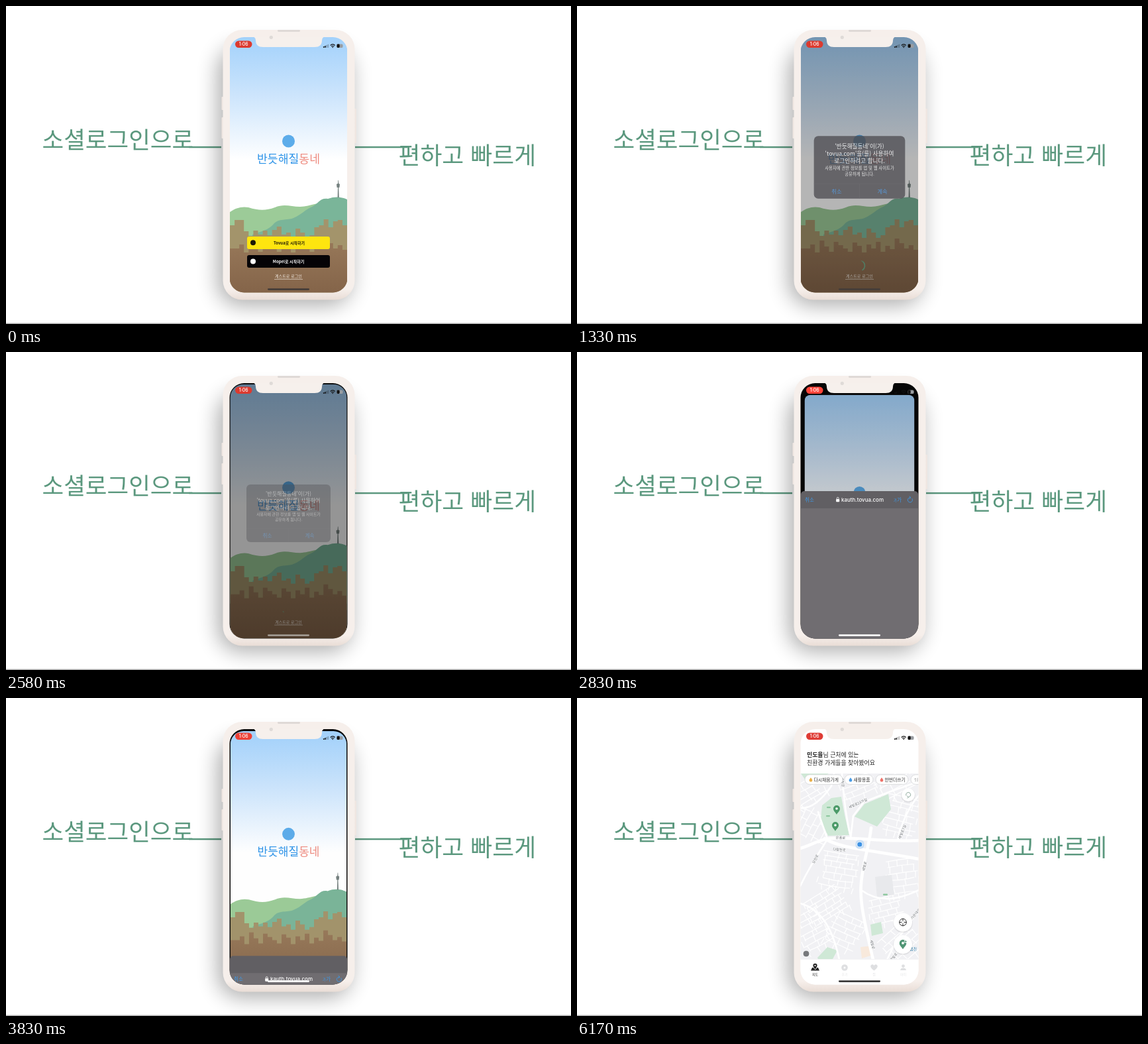
These frames come from a looping animation (853 px wide and 480 px high, 6260 ms). An HTML page:

```html
<!DOCTYPE html>
<html lang="ko">
<head>
<meta charset="utf-8">
<style>
  html, body { margin: 0; width: 100%; height: 100%; overflow: hidden; background: #fff; }
  svg { display: block; width: 100vw; height: 100vh; }
  text { font-family: "Noto Sans CJK KR", "Noto Sans CJK", "Noto Sans", sans-serif; }
</style>
</head>
<body>
<svg id="stage" viewBox="0 0 853 480"></svg>
<script>
const LOOP = 6260, STEP = 1000 / 12, CX = 426.5;
const stage = document.getElementById('stage');

// ---- markup helpers: text is placed by its vertical centre ----
const text = (x, y, size, str, attrs = '') =>
  `<text x="${x}" y="${y + size * .37}" font-size="${size}" ${attrs}>${str}</text>`;
const mid = (x, y, size, str, attrs = '') => text(x, y, size, str, 'text-anchor="middle" ' + attrs);
const rect = (x, y, w, h, fill, r = 0, attrs = '') =>
  `<rect x="${x}" y="${y}" width="${w}" height="${h}" rx="${r}" fill="${fill}" ${attrs}/>`;
const dot = (x, y, r, fill, attrs = '') => `<circle cx="${x}" cy="${y}" r="${r}" fill="${fill}" ${attrs}/>`;
const path = (d, attrs) => `<path d="${d}" ${attrs}/>`;
const line = (d, color, w = 1) => path(d, `fill="none" stroke="${color}" stroke-width="${w}" stroke-linecap="round" stroke-linejoin="round"`);
const group = (id, body, attrs = '') => `<g id="${id}" ${attrs}>${body}</g>`;

function random(seed) {
  return () => (seed = (seed * 16807) % 2147483647) / 2147483647;
}

function skyline(tops, color) {
  const w = 177 / tops.length;
  const steps = tops.map((y, i) => `V${y}H${(338 + (i + 1) * w).toFixed(1)}`).join('');
  return path(`M338 433${steps}V433Z`, `fill="${color}"`);
}

// ---- login screen ----
const tower = path('M500.6 289L501 274H499.6L499 269L501 268L501.4 263H502L502.3 268L504 269L503.4 274H502.2L502.8 289Z', 'fill="#75817f"');

const buttons = rect(364, 348, 125, 19, '#fee50f', 3) + dot(373, 357.3, 4, '#1c1805') +
  mid(427.5, 357.5, 6, 'Tovua로 시작하기', 'font-weight="700" fill="#1c1805"') +
  rect(364, 376, 125, 19, '#050306', 3) + dot(373, 385.5, 4, '#fff') +
  mid(426.5, 385.5, 6, 'Mopel로 시작하기', 'font-weight="700" fill="#fff"');

const login = rect(338, 47, 177, 386, 'url(#sky)') +
  path('M338 311C346 305 356 302 366 304C382 309 392 309 406 304C420 298 430 303 444 303C462 302 470 295 515 293V380H338Z', 'fill="#9ccb98"') +
  path('M372 345C390 339 397 337 404 329C412 320 424 324 434 320C446 315 452 307 462 303C472 298 474 289 486 291C497 287 506 288 515 292V390H372Z', 'fill="#7ab599"') +
  tower +
  skyline([331, 323, 323, 340, 347, 339, 345, 339, 346, 338, 333, 345, 342, 350, 336, 342, 350, 346, 334, 331, 322, 334, 325, 323, 331], '#a3946b') +
  skyline([366, 366, 360, 372, 354, 363, 371, 356, 361, 366, 371, 357, 362, 372, 360, 366, 356, 371, 362, 367, 351, 358, 366, 361, 368], 'url(#ground)') +
  dot(CX, 204, 9.5, '#5cacea') +
  mid(CX, 231, 17.2, '반듯해질<tspan fill="#ee8a7e">동네</tspan>', 'font-weight="300" fill="#2c93e8"') +
  group('buttons', buttons) +
  `<circle id="spinner" cx="${CX}" cy="392" r="8" fill="none" stroke="#6fb08c" stroke-width="1.6" pathLength="360"/>` +
  mid(CX, 408, 6.1, '게스트로 로그인', 'fill="#f3ece4"') + rect(405, 412.3, 43, .6, '#f3ece4') +
  `<rect id="dim" x="338" y="47" width="177" height="386"/>`;

// ---- permission alert ----
const alertBox = rect(363, 200, 127, 87, '#4f4e53', 6) +
  ["'반듯해질동네'이(가)", "'tovua.com'을(를) 사용하여", '로그인하려고 합니다.']
    .map((s, i) => mid(CX, 214.4 + i * 10.1, 8, s, 'font-weight="500" fill="#fff"')).join('') +
  mid(CX, 245, 5.9, '사용자에 관한 정보를 앱 및 웹 사이트가', 'fill="#f0f0f0"') +
  mid(CX, 252.7, 5.9, '공유하게 됩니다.', 'fill="#f0f0f0"') +
  rect(363, 266.5, 127, .4, '#5c5b60') + rect(CX, 266.5, .4, 20.5, '#5c5b60') +
  mid(394.6, 277, 7.6, '취소', 'fill="#3f8fe0"') + mid(458.4, 277, 7.6, '계속', 'fill="#3f8fe0"');

// ---- web sheet ----
const BLUE = '#3f97e3';
const addressBar = text(344, 89, 7.6, '취소', `fill="${BLUE}"`) +
  rect(391.2, 88, 5, 4.4, '#fff', .8) + line('M392.3 88V86.8A1.4 1.4 0 0 1 395.1 86.8V88', '#fff', .8) +
  text(399, 89, 8, 'kauth.tovua.com', 'font-weight="500" style="font-family:Inter,sans-serif" fill="#fff"') +
  text(478, 90, 5.4, '가', `fill="${BLUE}"`) + text(483, 89, 7.6, '가', `fill="${BLUE}"`) +
  line('M506 87.6A3.6 3.6 0 1 1 502.8 85.8M502 84L504 85.8L502 87.6', BLUE, .9);

const page = rect(347, 164, 159, 146, '#fff', 6) +
  path('M347 283H506V304A6 6 0 0 1 500 310H353A6 6 0 0 1 347 304Z', 'fill="#fee50d"') +
  dot(427, 190, 11.5, '#9fcbd0') +
  mid(CX, 211, 5.9, '반듯해질동네', 'fill="#8a8a8a"') +
  rect(369, 223, 115, 15, '#fff', 7.5, 'stroke="#f4f4f4" stroke-width=".7"') +
  mid(CX, 230.5, 7.4, 'qzru7391058@vmail.test', 'font-weight="600" style="font-family:Inter,sans-serif" fill="#222"') +
  mid(CX, 252.5, 6.5, '해당 토부아 계정으로', 'fill="#333"') +
  mid(CX, 263, 6.5, "'반듯해질동네'에 로그인합니다.", 'fill="#333"') +
  mid(CX, 296.5, 6.5, '계속하기', 'fill="#2c2805"') +
  mid(CX, 326, 6.5, '다른 토부아계정으로 로그인', 'fill="#d6d4d6"') + rect(388, 330.4, 77, .6, '#d6d4d6');

const sheet = path('M338 440V81A5 5 0 0 1 343 76H510A5 5 0 0 1 515 81V440Z', 'fill="#615f63"') +
  rect(338, 102, 177, 291, '#706d71') + group('bar', addressBar) + group('page', page) +
  line('M353.5 402L349.5 406L353.5 410M387.5 402L391.5 406L387.5 410', '#7b797e', 1) +
  line('M499 404H497V411.5H505V404H503M501 408V400.8M498.8 402.8L501 400.6L503.2 402.8', BLUE, .9);

// ---- home screen with map ----
function streets() {
  const rnd = random(71);
  // centre x, centre y, width, height, angle, spacing
  const blocks = [
    [352, 190, 50, 50, -62, 9], [350, 140, 50, 30, -30, 9], [425, 133, 60, 26, -22, 9],
    [490, 180, 56, 60, 14, 9], [480, 132, 60, 30, -28, 10], [395, 262, 58, 56, 9, 8],
    [378, 315, 70, 46, -32, 8], [354, 350, 50, 56, -28, 9], [405, 355, 56, 52, 24, 9],
    [492, 272, 50, 56, -8, 9], [465, 320, 54, 38, -14, 8], [490, 370, 60, 50, -42, 9]];
  return blocks.map(([x, y, w, h, angle, gap]) => {
    let d = '';
    for (let v = -h / 2; v < h / 2; v += gap * (.8 + rnd() * .5)) {
      d += `M${-w / 2 + rnd() * 10} ${v}Q0 ${v + rnd() * 5 - 2} ${w / 2 - rnd() * 10} ${v}`;
      for (let u = -w / 2 + rnd() * 12; u < w / 2; u += gap * (1.2 + rnd() * 1.3)) d += `M${u} ${v}L${u + rnd() * 3 - 1.5} ${v + gap}`;
    }
    return `<g transform="translate(${x} ${y}) rotate(${angle})">${line(d, '#fff', 1.2)}</g>`;
  }).join('');
}

const poly = (points, fill) => `<polygon points="${points}" fill="${fill}"/>`;
const GREEN = '#cfe8d6';
const roads = ['M337 227C355 222 366 213 382 212C420 209 460 218 516 215', 'M374 212C396 227 440 229 516 243',
  'M444 196C441 225 431 250 429 280C426 310 437 350 447 395', 'M337 284C352 252 365 235 378 213L364 172',
  'M337 166C355 168 372 150 384 133L388 114', 'M400 114C402 150 408 190 414 213',
  'M413 212L417 178L433 157L471 142L516 126', 'M484 214C490 190 500 165 516 147',
  'M429 290C460 312 490 302 516 290', 'M468 395C480 368 498 342 516 322', 'M337 310C365 318 385 342 396 395'];

const labels = [[424, 159, -24, '새빛로23가길'], [398, 211, 3, '은풍로'], [396, 229, 4, '다람천로'],
  [360, 243, -64, '모란로'], [434, 254, -77, '새빛로'], [491, 202, -68, '새빛로7길'],
  [446, 372, 76, '새빛로'], [511, 326, -50, '가온대로'], [401, 127, 84, '새빛로'], [478, 391, -52, '물빛로']]
  .map(([x, y, a, s]) => `<g transform="translate(${x} ${y}) rotate(${a})">${mid(0, 0, 5.3, s, 'fill="#666a70" stroke="#fff" stroke-width="1.2" paint-order="stroke"')}</g>`).join('');

const pin = (x, y, s = 1, fill = '#4b9a68') =>
  `<g transform="translate(${x} ${y}) scale(${s})">${path('M0 7C-1.5 3.5 -5 2 -5 -2A5 5 0 0 1 5 -2C5 2 1.5 3.5 0 7Z', `fill="${fill}"`)}${dot(0, -2, 1.8, '#fff')}</g>`;
const drop = (x, y, fill) => path(`M${x} ${y - 3.3}C${x + 1} ${y - 1.5} ${x + 2.4} ${y - .5} ${x + 2.4} ${y + 1}A2.4 2.4 0 0 1 ${x - 2.4} ${y + 1}C${x - 2.4} ${y - .5} ${x - 1} ${y - 1.5} ${x} ${y - 3.3}Z`, `fill="${fill}"`);
const chip = (x, w, color, label) => rect(x, 115.8, w, 14.6, '#fff', 7.3, 'stroke="#d5d6d9" stroke-width=".8"') +
  drop(x + 9, 123.2, color) + text(x + 13.5, 123.3, 6.8, label, 'fill="#333"');
const fab = (x, y, r) => dot(x, y + 1, r + .8, '#000', 'opacity=".08"') + dot(x, y, r, '#fff');

const map = rect(336, 114, 182, 280, '#f1f1f4') + streets() +
  poly('338,114 380,114 368,121 345,124', GREEN) + poly('370,162 384,151 399,149 404,176 411,207 379,208 368,184', GREEN) +
  poly('434,160 470,145 474,168 453,194 419,179', GREEN) +
  poly('443,342 459,338 462,355 445,359', GREEN) + poly('363,392 378,376 393,381 386,394 364,394', GREEN) +
  poly('450,270 475,267 479,297 453,301', '#e8e9ec') + poly('428,376 445,374 446,388 430,393', '#f8e9dc') +
  roads.map((d, i) => line(d, '#fff', i < 3 ? 4.6 : 2.6)).join('') +
  rect(377, 164, 6, 2.2, '#8fc9a0', 1) + rect(376, 177, 6, 2.2, '#8fc9a0', 1) + rect(462, 295.5, 7, 2.6, '#8fc9a0', 1) +
  group('labels', labels + text(502, 379, 6, '샘천', 'fill="#3c87b0"')) +
  group('pinA', pin(390, 194)) + group('pinB', pin(392, 169)) +
  rect(420.5, 214.5, 13, 13, '#c9dff5', 5) + dot(426.8, 221, 4.3, '#fff') + dot(426.8, 221, 3.6, '#3d92e4') +
  dot(346, 386, 5, '#77797c', 'stroke="#fff" stroke-width="1"');

const person = (x, y, c) => dot(x, y - 2.4, 2.4, c) + path(`M${x - 4.5} ${y + 4}Q${x - 4} ${y + .6} ${x} ${y + .6}T${x + 4.5} ${y + 4}Z`, `fill="${c}"`);
const PALE = '#dedfe1';
const nav = rect(336, 394, 182, 40, '#fff') + rect(336, 394, 182, .6, '#ececee') +
  path('M353 411.5L355 407H364L366 411.5Z', 'fill="#222"') + line('M359.5 409.5L356.5 406H362.5Z', '#fff', 1) + pin(359.5, 405, .62, '#222') +
  dot(404, 407, 4.8, PALE) + dot(404, 407, 1.5, '#fff') +
  path('M448.5 411.5C444 408 443 406 443.3 404.5C444 401.5 447.4 401.5 448.5 404C449.6 401.5 453 401.5 453.7 404.5C454 406 453 408 448.5 411.5Z', `fill="${PALE}"`) +
  person(492.5, 407, PALE) +
  mid(359.5, 417, 5, '지도', 'fill="#222"') +
  [[404, '후기'], [448.5, '찜'], [492.5, '마이']].map(([x, s]) => mid(x, 417, 5, s, 'fill="#e4e5e7"')).join('');

const home = rect(336, 46, 182, 388, '#fff') + map +
  text(347, 85.5, 8.9, '<tspan font-weight="700">민도율</tspan>님 근처에 있는', 'fill="#222"') +
  text(347, 97.5, 8.9, '친환경 가게들을 찾아봤어요', 'fill="#222"') +
  chip(344, 57, '#eab04a', '다시채움가게') + chip(404, 43, '#4a9ce6', '새활용품') + chip(451, 49, '#ee7168', '한번더쓰기') +
  rect(504, 115.8, 30, 14.6, '#fff', 7.3, 'stroke="#d5d6d9" stroke-width=".8"') + line('M511 126V121L509.7 122.5M514 121V126', '#999', .7) +
  fab(500, 146, 10) + line('M496.8 147A3.5 3.5 0 1 1 500.5 149.5M498.5 148.2L500.4 149.5L498.9 151', '#7c9c8e', .9) +
  fab(492, 338.5, 14) + '<circle cx="492" cy="338.5" r="5.3" fill="none" stroke="#333" stroke-width="1"/>' +
  line('M492 333.2V336.5M492 340.5V343.8M486.7 338.5H490M494 338.5H497.3', '#333', 1) +
  fab(492, 372, 14) + pin(492, 372, 1.05, '#4f9575') + dot(496, 367.5, 2.2, '#fff') + line('M494.6 367.5H497.4M496 366.1V368.9', '#4f9575', .9) +
  nav;

// ---- phone and captions ----
const status = '<rect id="pill" x="346" y="52.5" width="25.5" height="10.4" rx="5.2"/>' +
  mid(358.8, 57.6, 7, '1:06', 'font-weight="500" style="font-family:Inter,sans-serif" fill="#fff"') +
  [0, 1, 2, 3].map(i => rect(479 + i * 2.2, 61 - i * 1.1, 1.5, 2 + i * 1.1, '#111', .4, i > 1 ? 'opacity=".3"' : '')).join('') +
  line('M490 59.2Q493.2 56.6 496.4 59.2M491.4 60.9Q493.2 59.5 495 60.9', '#111', 1.1) + dot(493.2, 62.4, .8, '#111') +
  rect(499.5, 57.6, 9, 5.4, '#9a9da1', 1.6) + rect(499.5, 57.6, 4.2, 5.4, '#111', 1.4);

const TEAL = '#5b987e';
stage.innerHTML = `<defs>
  <linearGradient id="sky" x1="0" y1="0" x2="0" y2="1"><stop stop-color="#a2d1fb"/><stop offset=".22" stop-color="#cbe4fc"/><stop offset=".48" stop-color="#fff"/></linearGradient>
  <linearGradient id="ground" x1="0" y1="0" x2="0" y2="1"><stop stop-color="#98795a"/><stop offset="1" stop-color="#846449"/></linearGradient>
  <linearGradient id="shell" x1="0" y1="0" x2="0" y2="1"><stop offset=".96" stop-color="#f6efeb"/><stop offset="1" stop-color="#e9ddd6"/></linearGradient>
  <filter id="blur" x="-40%" y="-20%" width="180%" height="140%"><feGaussianBlur stdDeviation="16"/></filter>
  <clipPath id="screen"><rect x="337.5" y="47" width="178" height="385.5" rx="22"/></clipPath>
  <clipPath id="card"><rect id="cardRect" x="338" y="47" width="177" height="386"/></clipPath>
  </defs>` +
  rect(0, 0, 853, 480, '#fff') + rect(0, 478.6, 853, 1.4, '#a9a9a9') +
  rect(276, 211.8, 49, 2.5, TEAL) + rect(527, 211.8, 79, 2.5, TEAL) +
  `<text x="54.5" y="215" font-size="35.5" fill="${TEAL}">소셜로그인으로</text>` +
  `<text x="592.5" y="239" font-size="35.8" fill="${TEAL}">편하고 빠르게</text>` +
  rect(320, 62, 201, 390, '#000', 34, 'opacity=".32" filter="url(#blur)"') +
  rect(325.5, 137, 4, 20, '#efe6e1', 1) + rect(325.5, 168, 4, 32, '#efe6e1', 1) + rect(525, 155, 4, 52, '#efe6e1', 1) +
  rect(327.5, 36, 199, 407.5, 'url(#shell)', 29) + rect(410, 36, 34, 3, '#dfd9d6', 1.4) +
  '<g clip-path="url(#screen)">' + group('backdrop', rect(336, 46, 182, 388, '#060606')) +
  group('login', `<g clip-path="url(#card)">${login}</g>`) + group('alert', alertBox) + group('sheet', sheet) + group('home', home) + status +
  path('M372 46Q377 47 377 52Q377 62 388 62H466Q477 62 477 52Q477 47 482 46Z', 'fill="#f6f0ec"') +
  '<rect id="indicator" x="395" y="426.3" width="63" height="2.6" rx="1.3"/></g>' +
  dot(400.3, 47.3, 2.6, '#dfdad7');

// ---- motion ----
const part = {};
stage.querySelectorAll('[id]').forEach(el => part[el.id] = el);
const set = (id, attrs) => Object.entries(attrs).forEach(([k, v]) => part[id].setAttribute(k, v));
const show = (id, on) => set(id, { display: on ? 'inline' : 'none' });
const ramp = (t, from, to) => Math.min(1, Math.max(0, (t - from) / (to - from)));
const smooth = p => p * p * (3 - 2 * p);
const zoom = (s, x, y) => `translate(${x} ${y}) scale(${s}) translate(${-x} ${-y})`;

function render(t) {
  const atHome = t >= 4330, loading = t >= 750;
  const alertIn = ramp(t, 1200, 1450), alertEase = 1 - (1 - alertIn) ** 2;
  const alertAlpha = alertEase * (1 - ramp(t, 2460, 2660));
  const leaving = 1 - (1 - ramp(t, 3580, 4080)) ** 3;
  const recede = smooth(ramp(t, 2500, 3000)) * (1 - leaving);
  const raise = smooth(ramp(t, 2600, 3000)) * (1 - leaving);

  show('home', atHome);
  show('login', !atHome);
  show('backdrop', recede > 0);
  show('buttons', !loading);
  show('spinner', loading && leaving === 0);
  const arc = 62 + 58 * Math.cos(2 * Math.PI * (t - 1333) / 833);
  set('spinner', { 'stroke-dasharray': `${arc} ${360 - arc}`, transform: `rotate(${(t - 1333) * .432 - arc / 2} ${CX} 392)` });

  set('login', { transform: zoom(1 - .085 * recede, CX, 329) });
  set('cardRect', { rx: recede > 0 ? 22 - 17 * recede : 0 });
  set('dim', { opacity: Math.max(.48 * ramp(t, 1200, 1420) * (1 - ramp(t, 2550, 2800)), .35 * recede ** 2) });
  set('alert', { opacity: alertAlpha, transform: zoom(1 + .18 * (1 - alertIn), CX, 243.5) });

  show('sheet', raise > 0 && !atHome);
  set('sheet', { transform: `translate(0 ${356 * (1 - raise)})` });
  set('bar', { transform: `translate(0 ${leaving > 0 ? 22 : 0})` });
  set('page', { opacity: ramp(t, 2990, 3160) });

  const mapLoad = ramp(t, 4450, 4850);
  set('labels', { opacity: mapLoad });
  set('pinA', { opacity: mapLoad });
  set('pinB', { opacity: ramp(t, 4700, 4900) });

  set('pill', { fill: t < 2600 ? '#dc3a2f' : t < 3600 ? '#ff453a' : t < 5400 ? '#ee4036' : '#df3c35' });
  set('indicator', { fill: t < 2500 ? '#453d39' : t < 2620 ? '#a09890' : t < 4080 ? '#fff' : t < 4750 ? '#9a9a9a' : '#3c3c3c' });
}

function tick(now) {
  const frame = Math.min(74, Math.floor((now % LOOP + 4) / STEP));
  render(frame * STEP);
  requestAnimationFrame(tick);
}
render(0);
requestAnimationFrame(tick);
</script>
</body>
</html>
```
